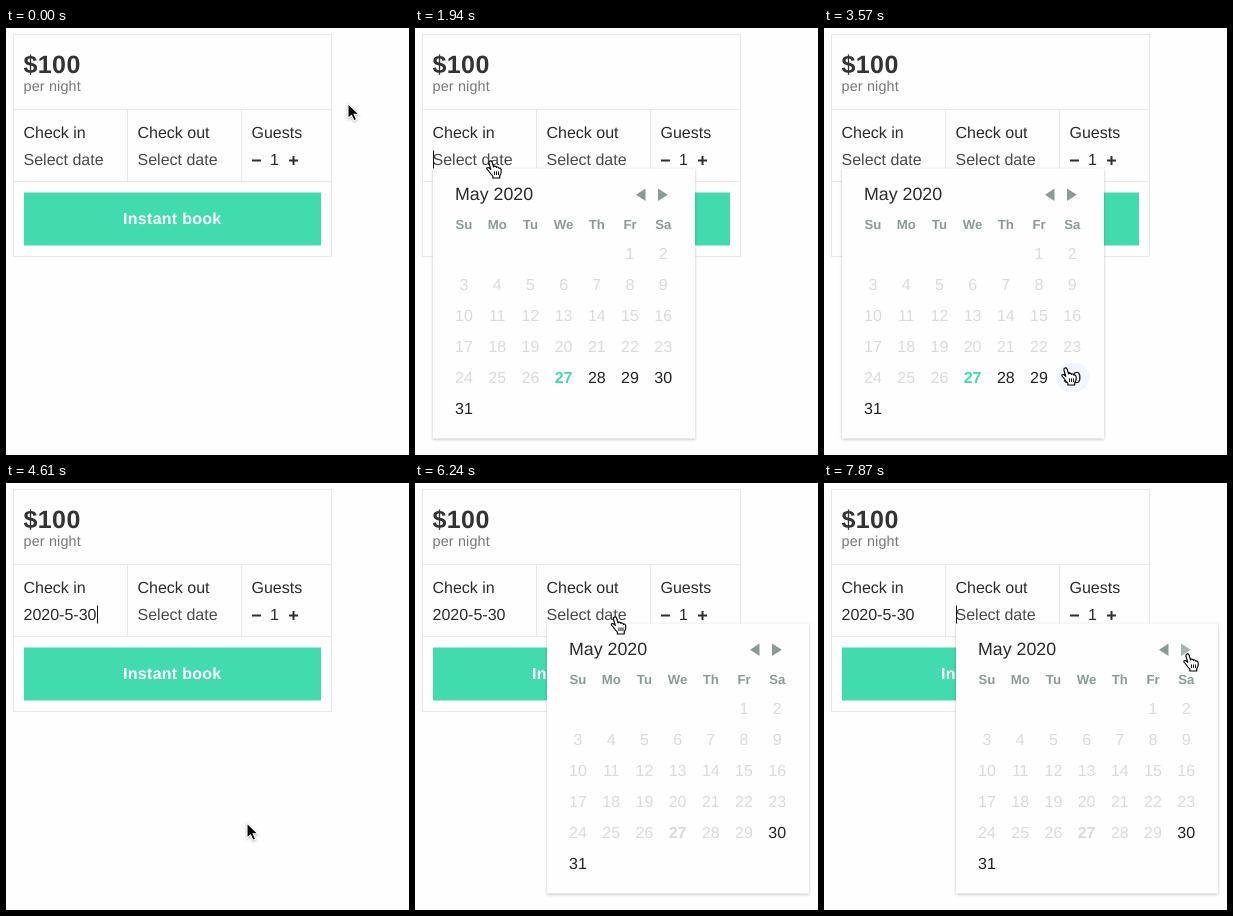
Write an HTML page that moves like this. It is 403 px wide and 427 px high and loops after 8 s.

```html
<!DOCTYPE html>
<html lang="en">
<head>
<meta charset="utf-8">
<title>Booking widget</title>
<style>
html, body { margin: 0; width: 100%; height: 100%; overflow: hidden; background: #fefefe; }
svg { display: block; width: 100%; height: 100%; }
text { font: 16px "Liberation Sans", Arial, sans-serif; fill: #2a2a2a; text-rendering: geometricPrecision; }
.price { font-size: 25px; font-weight: bold; letter-spacing: .4px; fill: #333; }
.unit { font-size: 14.4px; letter-spacing: .15px; fill: #777; }
.hint { fill: #4a4a4a; }
.book { font-weight: bold; letter-spacing: .27px; fill: #fff; }
.month { font-size: 17.8px; }
.mid { text-anchor: middle; }
.week { font-size: 13.2px; font-weight: bold; fill: #8b9a98; }
.off { fill: #d9dbdb; }
.on { fill: #222; }
.today { font-weight: bold; }
.today.on { fill: #41dbad; }
.panel { fill: #fefefe; filter: drop-shadow(0 1px 1.5px rgba(0, 0, 0, .24)); }
.nav { fill: #8b9a98; }
.line { fill: none; stroke: #e8e8e8; }
.caret { fill: #111; }
</style>
</head>
<body>
<svg viewBox="0 0 403 427" xmlns="http://www.w3.org/2000/svg">
  <rect class="line" x="7.5" y="6.5" width="318" height="222"/>
  <path class="line" d="M8 81.5H325M8 153.5H325M121.5 82V153M235.5 82V153"/>
  <text class="price" x="17.5" y="45">$100</text>
  <text class="unit" x="17.5" y="63">per night</text>
  <text x="17.5" y="110">Check in</text>
  <text x="131.5" y="110">Check out</text>
  <text x="245.5" y="110">Guests</text>
  <text class="hint" id="dateIn" x="17.5" y="137">Select date</text>
  <text class="hint" x="131.5" y="137">Select date</text>
  <text class="mid" x="268.5" y="137">1</text>
  <path d="M246 132.5h9M283 132.5h9M287.5 128v9" stroke="#2e2e2e" stroke-width="2"/>
  <rect x="18" y="164.5" width="297" height="53" fill="#41dbad"/>
  <text class="book mid" x="166.3" y="196">Instant book</text>
  <g id="calIn"></g>
  <g id="calOut"></g>
  <rect class="caret" id="caret" y="122.5" width="1" height="18"/>
  <path id="arrow" d="M0 0V15L3.5 11.8L6 17.2L8.6 16L6.2 10.7H10.8Z" fill="#000" stroke="#fff" stroke-width="1.1"
    style="filter:drop-shadow(0 1px 1px rgba(0,0,0,.3))"/>
  <g id="hand">
    <g transform="translate(-4 -1) scale(1.04)" stroke="#000" stroke-width="1.1" stroke-linejoin="round">
      <path fill="#fff" d="M5.8 1.9L7.3 6.7Q7.4 5.8 8.5 5.9Q9.8 6 10 7.2Q10.3 6.5 11.2 6.7Q12.3 6.9 12.5 8Q13.1 7.5 13.8 7.9Q14.6 8.4 14.6 9.6V11.5Q14.5 13.5 13.2 15V17.3H6.6V15.5Q4.7 13.7 3.3 11.5Q2.2 9.8 1.2 9Q.4 8.1 1.2 7.4Q2.2 6.8 3.4 7.9L4.6 9L2.8 2.9Q2.5 1.4 3.8 .9Q5.2 .5 5.8 1.9Z"/>
      <path fill="none" stroke-width=".9" d="M8.2 11V14.4M10.1 11V14.4M12 11V14.4"/>
    </g>
  </g>
</svg>
<script>
const LOOP = 8000, TICK = 148.5, BLINK = 500;
// Ticks at which something is clicked
const OPEN_IN = 13, PICK = 30, OPEN_OUT = 38;
const el = id => document.getElementById(id);
const show = (node, on) => { node.style.display = on ? '' : 'none'; };

// May 1, 2020 is a Friday; days before firstOpen are greyed out.
function calendar(id, left, firstOpen) {
  const col = i => left + 31 + i * 33.2;
  let s = `<rect class="panel" x="${left}" y="140.5" width="262" height="270"/>
    <text class="month" x="${left + 22}" y="172">May 2020</text>
    <path class="nav" d="M${left + 203} 166.7l9.5 -6.3v12.6z"/>
    <path class="nav next" d="M${left + 234.8} 166.7l-9.8 -6.3v12.6z"/>
    <rect class="pill" x="${left + 214.5}" y="335" width="33" height="29" rx="14.5" fill="#eff6fd"/>`;
  'Su Mo Tu We Th Fr Sa'.split(' ').forEach((d, i) => {
    s += `<text class="week mid" x="${col(i)}" y="200.7">${d}</text>`;
  });
  for (let d = 1; d <= 31; d++) {
    const cell = d + 4, cls = (d < firstOpen ? 'off' : 'on') + (d === 27 ? ' today' : '');
    s += `<text class="mid ${cls}" x="${col(cell % 7)}" y="${231 + 31 * Math.floor(cell / 7)}">${d}</text>`;
  }
  el(id).innerHTML = s;
}
calendar('calIn', 18, 27);
calendar('calOut', 132, 30);
const pill = el('calIn').querySelector('.pill');
const next = el('calOut').querySelector('.next');
show(el('calOut').querySelector('.pill'), false);

// Each leg curves past `via` and rests at `to` until the next one.
const home = [342, 75.5];
const legs = [
  { from: 2, till: 10, via: [280, 22], to: [75, 133] },
  { from: 15, till: 23, via: [150, 250], to: [241, 340] },
  { from: 32, till: 35, via: [225, 200], to: [207, 141] },
  { from: 35, till: 37, via: [203, 137], to: [199.5, 134] },
  { from: 43, till: 52, via: [395, 225], to: [363, 171] }
];
function pointer(n) {
  let pos = home;
  for (const { from, till, via, to } of legs) {
    if (n <= from) break;
    const k = Math.min(1, (n - from) / (till - from));
    const e = (1 - Math.cos(Math.PI * k)) / 2;
    pos = pos.map((p, i) => p * (1 - e) ** 2 + via[i] * 2 * e * (1 - e) + to[i] * e * e);
  }
  return pos;
}

function draw(t) {
  const n = Math.floor((t + 3) / TICK);
  const [x, y] = pointer(n);
  const inOpen = n >= OPEN_IN && n < PICK, outOpen = n >= OPEN_OUT, picked = n >= PICK;
  const overField = x < 235 && y > 120 && y < (inOpen || outOpen ? 141 : 153);
  const overDay = inOpen && x > 232 && y > 335;
  const overNext = outOpen && x > 355 && y < 180;
  const hand = overField || overDay || overNext;

  const label = el('dateIn');
  label.textContent = picked ? '2020-5-30' : 'Select date';
  label.setAttribute('class', picked ? '' : 'hint');
  show(el('calIn'), inOpen);
  show(el('calOut'), outOpen);
  show(pill, overDay);
  next.style.opacity = overNext ? .75 : 1;

  // The caret restarts its blink whenever focus changes.
  const [focus, caretX] = outOpen ? [OPEN_OUT, 132] : n > PICK ? [PICK + 1, 91] : [OPEN_IN, 18];
  const lit = (n - focus) * TICK % (2 * BLINK) < BLINK;
  show(el('caret'), n >= focus && n !== PICK && lit);
  el('caret').setAttribute('x', caretX);

  show(el('hand'), hand);
  show(el('arrow'), !hand);
  el(hand ? 'hand' : 'arrow').setAttribute('transform', `translate(${x} ${y})`);
}

const start = performance.now();
function loop() {
  draw((performance.now() - start) % LOOP);
  requestAnimationFrame(loop);
}
loop();
</script>
</body>
</html>
```
